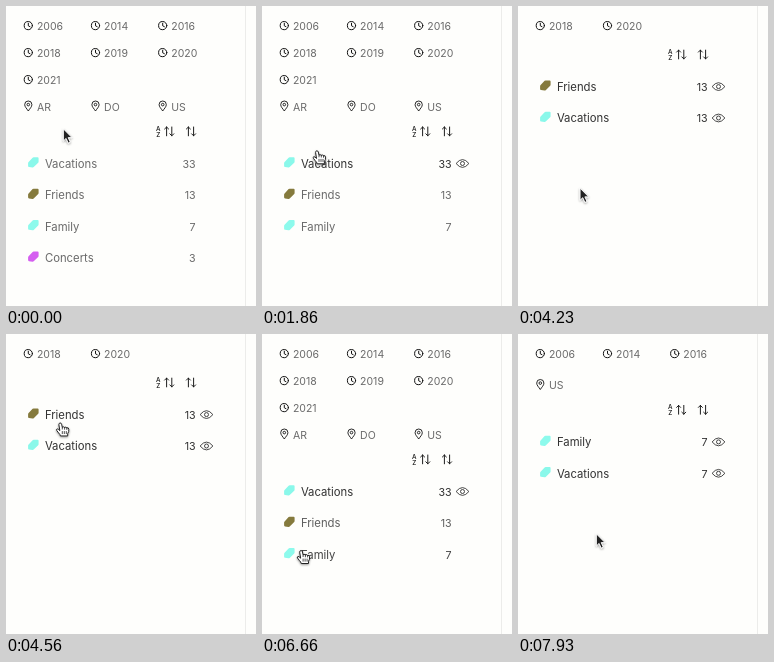
Write an HTML page that moves like this. It is 250 by 300 pixels and loops after 8000 ms.

```html
<!DOCTYPE html>
<html lang="en">
<head>
<meta charset="utf-8">
<title>Tag filter</title>
<style>
html, body { margin: 0; width: 100%; height: 100%; overflow: hidden; background: #fefefc; }
svg { display: block; width: 250px; height: 300px; font-family: Inter, "Open Sans", sans-serif; }
</style>
</head>
<body>
<svg id="stage" viewBox="0 0 250 300">
  <defs>
    <g id="clock" fill="none" stroke="#111" stroke-linecap="round">
      <circle r="4.1"/><path d="M0-2.4V.2L1.7 1.1"/>
    </g>
    <g id="pin" fill="none" stroke="#111" stroke-width=".9">
      <path d="M0 5C-1.5 2.6-3.6.9-3.6-1.4a3.6 3.6 0 0 1 7.2 0C3.6.9 1.5 2.6 0 5Z"/><circle cy="-1.4" r="1.3"/>
    </g>
    <path id="tag" d="M.2-5.2H4.2Q5.2-5.2 5.2-4.2V-.8Q5.2-.2 4.8.2L.3 4.6Q-.2 5.1-.9 5L-4.4 4.5Q-5.3 4.3-5.3 3.4V.6Q-5.3 0-4.8-.5L-.8-4.8Q-.4-5.2.2-5.2Z"/>
    <g id="eye" fill="none" stroke="#333" stroke-width=".9">
      <path d="M-6.4 0Q0-7.8 6.4 0Q0 7.8-6.4 0Z"/><circle r="2"/>
    </g>
    <g id="arrows" fill="none" stroke="#111" stroke-width=".95" stroke-linecap="round" stroke-linejoin="round">
      <path d="M-2.6 4.4V-4.4M-4.6-2.4l2-2l2 2M2.6-4.4V4.4M.6 2.4l2 2l2-2"/>
    </g>
    <g id="sort">
      <text x="152.2" y="-.9" font-size="6.3" font-weight="500" text-anchor="middle" fill="#111">A</text>
      <text x="152.2" y="5.1" font-size="6.3" font-weight="500" text-anchor="middle" fill="#111">Z</text>
      <use href="#arrows" x="163.2"/><use href="#arrows" x="185"/>
    </g>
    <filter id="shadow" x="-50%" y="-50%" width="200%" height="200%">
      <feDropShadow dx="0" dy="1" stdDeviation=".9" flood-opacity=".4"/>
    </filter>
    <path id="arrow" filter="url(#shadow)" d="M.4.4V12.4L3.1 9.9L5.2 14.6L7.3 13.7L5.2 9.1H9Z" fill="#222" stroke="#fff" stroke-width=".9"/>
    <g id="hand" filter="url(#shadow)" stroke="#222" stroke-linejoin="round" stroke-linecap="round">
      <path fill="#fff" d="M-2.4 1.8Q-2.3.5-1.2.5Q0 .5.3 1.7L1 4.8Q2.2 3.9 3.3 5Q4.6 4.2 5.5 5.4Q7.4 4.8 7.5 6.8Q7.8 9.4 6.4 11.2V13.5H-.9Q-1.1 11.9-2.7 10.5L-4.6 8Q-5.3 6.8-4.2 6.4Q-3.2 6.2-1.7 7.9Z"/>
      <path fill="none" stroke-width=".8" d="M1 4.8V6.6M3.3 5V6.8M5.5 5.4V7M1 9V11.2M3 9V11.2M5 9V11.2"/>
    </g>
  </defs>
  <path d="M239.5 0V300" stroke="#ececea"/>
  <g id="scene"></g>
</svg>
<script>
const LOOP = 8000, FADE = 280, SAMPLES = 14;
const COLUMN = 67.2, ROW_STEP = 31.4;
const COLORS = { Vacations: '#8af8ea', Friends: '#857a3d', Family: '#8dfaec', Concerts: '#d55ff0' };

const smooth = p => p * p * (3 - 2 * p);
const easeIn = p => p * p;
const easeOut = p => 1 - (1 - p) * (1 - p);

// Pointer hot spot: time, x, y, easing towards this point
const PATH = [
  [0, 57, 122.5], [340, 57, 122.5], [760, 60, 161.5, smooth],
  [1700, 60, 161.5], [1860, 56, 144.3, smooth],
  [2310, 56, 144.3], [2760, 62, 186.6, smooth],
  [4180, 62, 186.6], [4560, 55.3, 88.5, smooth], [4860, 55, 82, easeOut],
  [5600, 55, 82], [5830, 53, 101, easeIn], [5960, 58, 134, easeOut],
  [6290, 58, 134], [6520, 30, 211, smooth], [6660, 40, 216, smooth], [6830, 49, 217, easeOut],
  [7580, 49, 217], [7710, 53, 225, smooth], [7930, 78, 199.5, smooth], [LOOP, 78, 199.5]
];

const yearRows = [['2006', '2014', '2016'], ['2018', '2019', '2020'], ['2021']];
const grid = (rows, top, icon) => rows.flatMap((row, r) =>
  row.map((label, c) => ({ label, icon, x: 22.3 + c * COLUMN, y: top + r * 27 })));
const view = (facets, sortY, tags) => ({
  facets, sortY,
  tags: Object.entries(tags).map(([label, count], i) => ({ label, count, y: sortY + 32.4 + i * ROW_STEP }))
});

const allFacets = [...grid(yearRows, 19.6, 'clock'), ...grid([['AR', 'DO', 'US']], 100, 'pin')];
const base = { Vacations: 33, Friends: 13, Family: 7 };
const VIEWS = {
  all: view(allFacets, 125.4, { ...base, Concerts: 3 }),
  vacations: view(allFacets, 125.4, base),
  friends: view(grid([['2018', '2020']], 19.6, 'clock'), 48.5, { Friends: 13, Vacations: 13 }),
  family: view([...grid([yearRows[0]], 19.6, 'clock'), ...grid([['US']], 50.5, 'pin')], 75.8, { Family: 7, Vacations: 7 })
};

const VIEW_TIMES = [[0, 'all'], [1330, 'vacations'], [3530, 'friends'], [5360, 'vacations'], [7430, 'family']];
const PICK_TIMES = [[0, []], [1030, ['Vacations']], [3330, ['Vacations', 'Friends']],
  [5160, ['Vacations']], [7130, ['Vacations', 'Family']]];
const latest = (list, t) => list.findLast(([start]) => start <= t)[1];

function pointer(t) {
  const i = PATH.findIndex(([time]) => time > t);
  const [t0, x0, y0] = PATH[i - 1], [t1, x1, y1, ease = smooth] = PATH[i];
  const p = ease((t - t0) / (t1 - t0));
  return { x: x0 + (x1 - x0) * p, y: y0 + (y1 - y0) * p };
}

function hovered(t) {
  const { x, y } = pointer(t), { tags, facets } = VIEWS[latest(VIEW_TIMES, t)];
  const tag = tags.find(row => Math.abs(y - row.y) < ROW_STEP / 2);
  const facet = facets.find(f => Math.abs(y - f.y) < 13.4 && x > f.x - 5 && x < f.x + 10 + f.label.length * 6.5);
  return (tag || facet)?.label;
}

// Share of the recent past in which a label was hovered or picked
function emphasis(t) {
  const recent = Array.from({ length: SAMPLES }, (_, k) => {
    const past = Math.max(0, t - k * FADE / SAMPLES);
    return [hovered(past), ...latest(PICK_TIMES, past)];
  });
  return label => recent.filter(active => active.includes(label)).length / SAMPLES;
}

const shade = amount => {
  const v = Math.round(106 - 56 * amount);
  return `rgb(${v},${v},${v})`;
};
const use = (id, x, y, extra = '') => `<use href="#${id}" transform="translate(${x} ${y})" ${extra}/>`;
const text = (value, x, y, fill, size, anchor = 'start') =>
  `<text x="${x}" y="${y}" fill="${fill}" font-size="${size}" text-anchor="${anchor}">${value}</text>`;

function draw(t) {
  const { facets, sortY, tags } = VIEWS[latest(VIEW_TIMES, t)];
  const picked = latest(PICK_TIMES, t), level = emphasis(t), { x, y } = pointer(t);
  const parts = facets.map(f =>
    use(f.icon, f.x, f.y) + text(f.label, f.x + 8.6, f.y + 4.6, shade(level(f.label)), 10.5));
  parts.push(use('sort', 0, sortY));
  for (const row of tags) {
    const fill = shade(level(row.label));
    parts.push(use('tag', 27.4, row.y - 1.3, `fill="${COLORS[row.label]}"`),
      text(row.label, 38.9, row.y + 4, fill, 11.3),
      text(row.count, 189.6, row.y + 4, fill, 10.7, 'end'));
    if (picked.includes(row.label)) parts.push(use('eye', 200.5, row.y - .3));
  }
  parts.push(use(hovered(t) ? 'hand' : 'arrow', x, y));
  document.getElementById('scene').innerHTML = parts.join('');
}

function tick() {
  draw(performance.now() % LOOP);
  requestAnimationFrame(tick);
}
tick();
</script>
</body>
</html>
```
